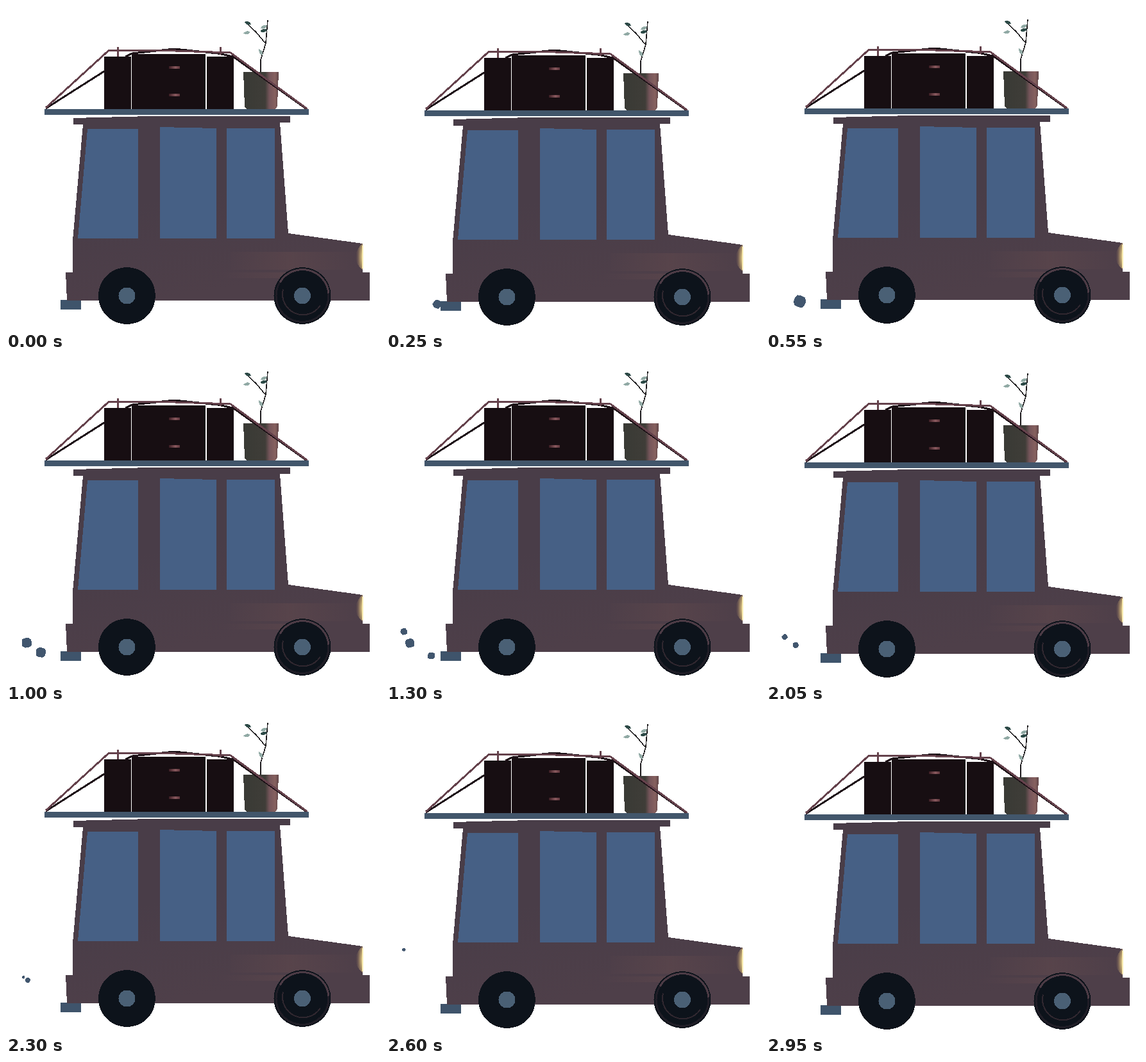
Recreate the animation shown at these times as an HTML page. Size 583 px wide and 506 px high, loop 3000 ms.

```html
<!DOCTYPE html>
<html lang="en">
<head>
<meta charset="utf-8">
<title>Packed car</title>
<style>
html, body { margin: 0; width: 100%; height: 100%; overflow: hidden; background: #fff; }
svg { display: block; width: 100%; height: 100%; shape-rendering: crispEdges; }
</style>
</head>
<body>
<svg viewBox="0 0 583 506">
  <defs>
    <linearGradient id="paint" x1="0" y1="0" x2="0.3" y2="1">
      <stop offset="0.5" stop-color="#493d48"/>
      <stop offset="1" stop-color="#4e3f49"/>
    </linearGradient>
    <linearGradient id="sheen">
      <stop offset="0" stop-color="#6a4d4e" stop-opacity="0"/>
      <stop offset="0.5" stop-color="#6a4d4e" stop-opacity="0.35"/>
      <stop offset="1" stop-color="#6a4d4e" stop-opacity="0"/>
    </linearGradient>
    <linearGradient id="pot">
      <stop offset="0" stop-color="#393a35"/>
      <stop offset="0.62" stop-color="#3f3d38"/>
      <stop offset="0.74" stop-color="#75555a"/>
      <stop offset="0.9" stop-color="#86615f"/>
      <stop offset="1" stop-color="#604649"/>
    </linearGradient>
    <linearGradient id="brass">
      <stop offset="0" stop-color="#3a1c22"/>
      <stop offset="0.6" stop-color="#8a5a5f"/>
      <stop offset="1" stop-color="#5c343a"/>
    </linearGradient>
    <radialGradient id="glow" cx="1" cy="0.5" r="1">
      <stop offset="0" stop-color="#f0dc93"/>
      <stop offset="0.4" stop-color="#b79c6c" stop-opacity="0.8"/>
      <stop offset="1" stop-color="#6a5050" stop-opacity="0"/>
    </radialGradient>
    <g id="wheel">
      <circle r="44.5" fill="#0d131b"/>
      <circle r="13" fill="#4a6075"/>
    </g>
    <path id="leaf" d="M0 0Q5-5 11 0Q5 5 0 0Z"/>
  </defs>

  <g id="smoke" fill="#41566e"></g>

  <g id="car">
    <path fill="#3f546b" d="M85 459H117V474H85Z"/>

    <!-- body -->
    <path fill="url(#paint)" d="M105 175L225 172H443V182H427L440 355L556 371V416H567V460H95L93 416H104V366L120 185H105Z"/>
    <path fill="url(#sheen)" d="M335 416H470V425H335ZM350 384H550V412H350Z"/>
    <path fill="#466085" d="M127 192H206V363H112ZM240 189L328 191V363H240ZM344 191H419V363H344Z"/>
    <path fill="url(#glow)" d="M556 370Q534 392 556 413Z"/>
    <path fill="#fbefb5" d="M555 374H557V410H555Z"/>

    <use href="#wheel" x="188.5" y="452.5"/>
    <use href="#wheel" x="462" y="452.5"/>
    <g transform="translate(462 452.5)" fill="none">
      <circle r="41" stroke="#1f1d26" stroke-width="3"/>
      <path stroke="#4c3b45" stroke-width="3" d="M-35-21A41 41 0 0 1 41-4"/>
      <path stroke="#30272f" stroke-width="2" d="M-30-10A32 32 0 0 0 28 15"/>
    </g>

    <!-- luggage -->
    <path fill="#170e12" d="M153 79H195V161H153ZM196 75H311V161H196ZM313 79H355V161H313Z"/>
    <path fill="url(#brass)" d="M254 94H271V98H254ZM254 137H271V141H254Z"/>

    <!-- plant -->
    <path fill="url(#pot)" d="M370 103H425L423 156Q422 161 417 161H378Q373 161 372 156Z"/>
    <g fill="none" stroke="#1c1a1c" stroke-width="1.6">
      <path d="M397 103V84L405 58L408 22"/>
      <path d="M405 59L390 41L374 26"/>
    </g>
    <g fill="#2d4a47">
      <use href="#leaf" transform="translate(372 25) rotate(20)"/>
      <use href="#leaf" transform="translate(407 37) rotate(165)"/>
    </g>
    <g fill="#91aaa5">
      <use href="#leaf" transform="translate(381 41) rotate(172)"/>
      <use href="#leaf" transform="translate(407 31) rotate(160)"/>
      <use href="#leaf" transform="translate(400 77) rotate(240)"/>
    </g>

    <!-- ropes and rack -->
    <g fill="none" stroke="#65424c" stroke-width="3">
      <path stroke="#1d1117" d="M62 160L153 102M186 79L197 74L262 67L330 74L354 79L470 162"/>
      <path d="M174 64V79M334 64V76"/>
      <path d="M62 159L160 69.500H250L350 73L470 161"/>
    </g>
    <path fill="#42566b" d="M60 161H472V170H60Z"/>
  </g>
</svg>
<script>
const LOOP = 3000, STEP = 50;
const car = document.getElementById('car');
const smoke = document.getElementById('smoke');
const puffs = Array.from({ length: 4 }, () =>
  smoke.appendChild(document.createElementNS('http://www.w3.org/2000/svg', 'polygon')));

// Puffs leave the pipe in turn, each smaller and shorter-lived; odd ones rise higher.
function drawPuff(puff, i, t) {
  const k = (t - 150 - 490 * i) / (1500 - 70 * i);
  const alive = k > 0 && k < 1;
  puff.style.display = alive ? '' : 'none';
  if (!alive) return;
  const rise = 66 + 31 * (i % 2) * i;
  const x = 27 + 65 * (1 - k) ** 3;
  const y = 466 - rise * k * k;
  const r = (10 - 1.7 * i) * Math.min(1, 0.5 + 3 * k) * (1 - k ** 3);
  const points = Array.from({ length: 10 }, (_, n) => {
    const angle = n / 5 * Math.PI;
    const reach = r * (1 + 0.08 * Math.cos(4 * angle + 6 * k + i));
    return [x + reach * Math.cos(angle), y + reach * Math.sin(angle)];
  });
  puff.setAttribute('points', points.join(' '));
}

// Settle from rest, then sway on the springs by whole pixels.
function bob(t) {
  const sway = t < 250
    ? Math.sin(t / 500 * Math.PI)
    : Math.cos((t - 250) / 225 * Math.PI);
  return Math.round(2.3 * sway);
}

function draw(now) {
  const t = Math.floor(now % LOOP / STEP) * STEP;
  car.setAttribute('transform', `translate(0 ${bob(t)})`);
  puffs.forEach((puff, i) => drawPuff(puff, i, t));
}

let start;
function tick(now) {
  start ??= now;
  draw(now - start);
  requestAnimationFrame(tick);
}
draw(0);
requestAnimationFrame(tick);
</script>
</body>
</html>
```
